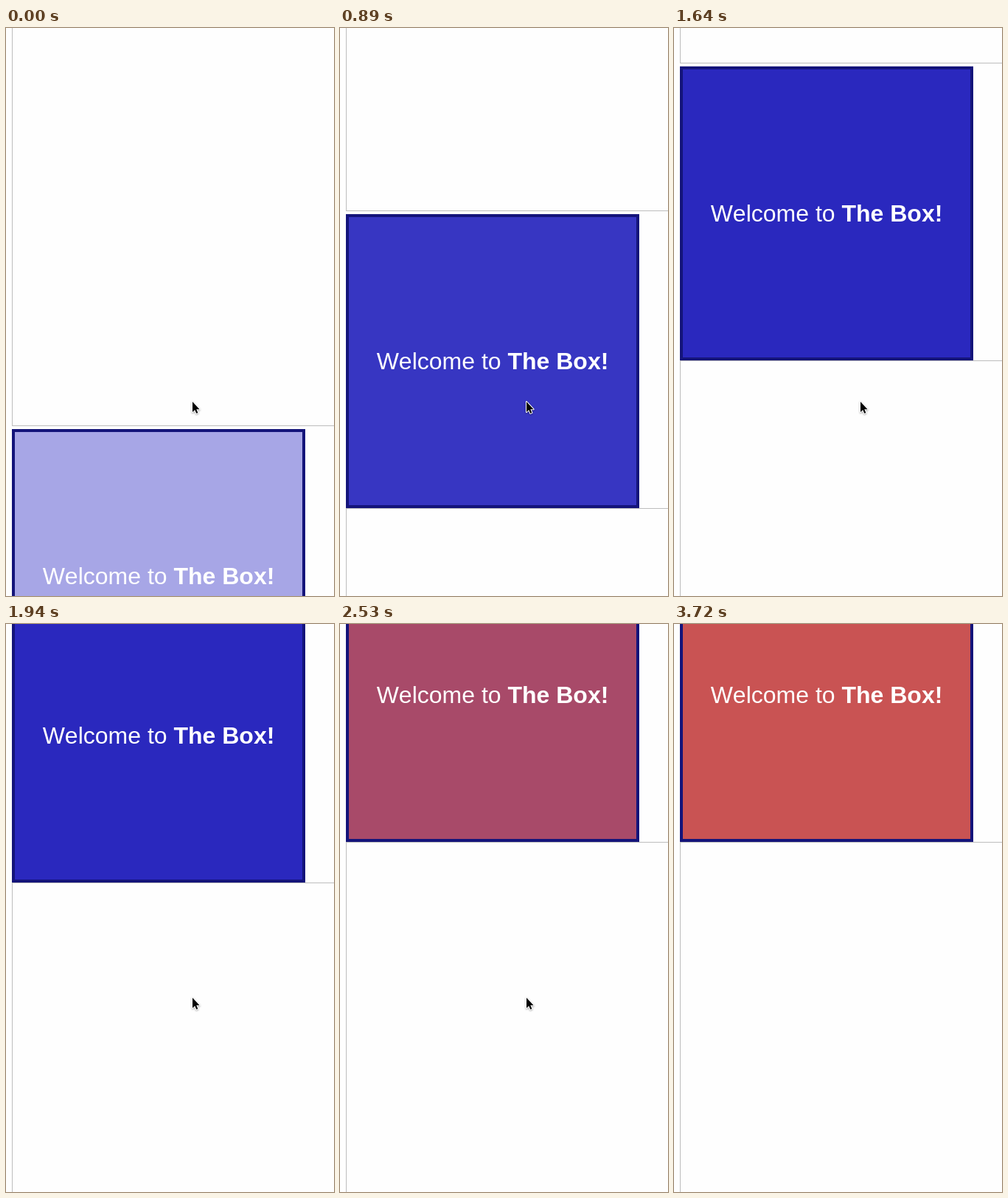
Animation of 445 by 769 pixels, one loop 4380 ms. Source, as an HTML page:

```html
<!DOCTYPE html>
<html lang="en">
<head>
<meta charset="utf-8">
<title>Scrolling box</title>
<style>
  html, body { margin: 0; width: 100%; height: 100%; overflow: hidden; background: #fefefe; }
  svg { display: block; }
  text { font: 32px "Liberation Sans", Arial, sans-serif; font-kerning: none; fill: #fff; }
  .bold { font-weight: bold; }
  .frame { fill: none; stroke: #bdbdbd; }
  #box { stroke: #14147a; stroke-width: 4; }
  #arrow { stroke: #fff; stroke-width: 2; paint-order: stroke; stroke-linejoin: round;
           filter: drop-shadow(0 1px 1px rgba(0, 0, 0, .35)); }
</style>
</head>
<body>
<svg width="445" height="769" viewBox="0 0 445 769">
  <!-- y = 0 is the bottom edge of the upper frame -->
  <g id="page">
    <rect class="frame" x="8.5" y="-999.5" width="600" height="1000"/>
    <rect class="frame" x="8.5" y="403.5" width="600" height="1000"/>
    <rect id="box" x="10" y="7" width="394" height="394"/>
    <text x="207" y="215" text-anchor="middle">Welcome to <tspan class="bold">The Box!</tspan></text>
  </g>
  <path id="arrow" d="M0 0V14L3.2 10.9L5.3 15.8L7.4 14.9L5.3 10.2H9.6Z"/>
</svg>
<script>
const LOOP = 4380;
const page = document.getElementById("page");
const box = document.getElementById("box");
const arrow = document.getElementById("arrow");

// [time, y of the upper frame's bottom edge]
const scroll = [
  [0, 538], [150, 461], [290, 411], [440, 369], [590, 319], [740, 289],
  [890, 247], [1040, 228], [1190, 172], [1340, 110], [1490, 78], [1640, 47],
  [1790, 2], [1940, -53], [2090, -81], [2240, -108], [2380, -108],
  [2530, -108], [2680, -108]
];
const pale = [167, 166, 230], blue = [42, 40, 190], red = [201, 83, 83];

const bez = (a, b, s) => 3 * a * s * (1 - s) ** 2 + 3 * b * s * s * (1 - s) + s ** 3;

// CSS "ease" curve
function ease(x) {
  if (x <= 0) return 0;
  if (x >= 1) return 1;
  let lo = 0, hi = 1;
  for (let i = 0; i < 24; i++) {
    const mid = (lo + hi) / 2;
    if (bez(.25, .25, mid) < x) lo = mid; else hi = mid;
  }
  return bez(.1, 1, lo);
}

function mix(a, b, k) {
  return `rgb(${a.map((v, i) => Math.round(v + (b[i] - v) * k))})`;
}

function color(t) {
  if (t >= 2680) return mix(red, red, 1);
  if (t >= 1940) return mix(blue, red, ease((t - 2040) / 1000));
  return mix(pale, blue, ease((t - 340) / 900));
}

function draw(t) {
  const [time, y] = scroll.findLast(step => step[0] <= t);
  page.setAttribute("transform", `translate(0 ${y})`);
  box.style.fill = color(time);
  arrow.setAttribute("transform", t < 3570 ? "translate(253 506)" : "translate(382 628)");
  arrow.style.display = t < 3720 ? "" : "none";
}

const start = performance.now();
function tick(now) {
  draw(Math.max(0, now - start) % LOOP);
  requestAnimationFrame(tick);
}
draw(0);
requestAnimationFrame(tick);
</script>
</body>
</html>
```
